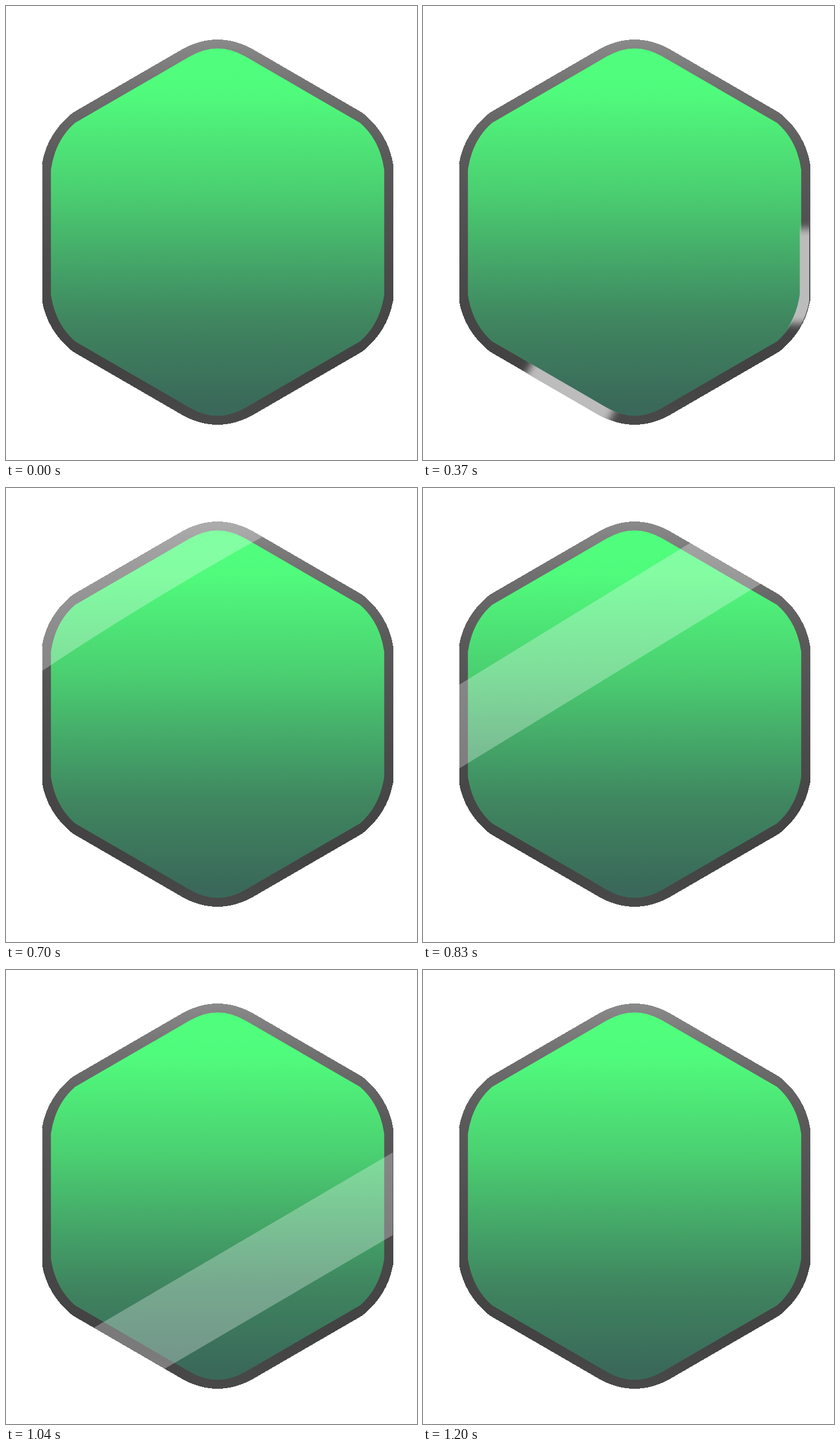
An HTML page for the animation above (1.24 s loop, 712 by 786 pixels).

```html
<!DOCTYPE html>
<html lang="en">
<head>
<meta charset="utf-8">
<title>Glossy hexagon</title>
<style>
  html, body { margin: 0; width: 100%; height: 100%; overflow: hidden; background: #fff; }
  svg { display: block; }
</style>
</head>
<body>
<svg width="712" height="786" viewBox="0 0 712 786">
  <defs>
    <linearGradient id="metal" gradientUnits="userSpaceOnUse" x1="0" y1="-334" x2="0" y2="334">
      <stop offset="0" stop-color="#8a8a8a"/>
      <stop offset=".12" stop-color="#727272"/>
      <stop offset=".3" stop-color="#5a5a5a"/>
      <stop offset=".6" stop-color="#4b4a4a"/>
      <stop offset=".85" stop-color="#424242"/>
      <stop offset="1" stop-color="#494949"/>
    </linearGradient>
    <linearGradient id="glass" gradientUnits="userSpaceOnUse" x1="0" y1="-318" x2="0" y2="318">
      <stop offset="0" stop-color="#50ff7d"/>
      <stop offset=".12" stop-color="#50fb7c"/>
      <stop offset=".39" stop-color="#4bcf71"/>
      <stop offset=".64" stop-color="#429a65"/>
      <stop offset=".75" stop-color="#3f845f"/>
      <stop offset=".97" stop-color="#3a695a"/>
      <stop offset="1" stop-color="#3a685a"/>
    </linearGradient>
    <filter id="soft" filterUnits="userSpaceOnUse" x="-400" y="-420" width="800" height="840"
            color-interpolation-filters="sRGB">
      <feGaussianBlur stdDeviation="7"/>
    </filter>
    <clipPath id="body"><path class="outer"/></clipPath>
    <clipPath id="rim"><path id="ring" clip-rule="evenodd" transform="translate(-1.3 0)"/></clipPath>
  </defs>
  <g transform="translate(366.5 391.5)">
    <path class="outer" fill="url(#metal)" shape-rendering="crispEdges"/>
    <path id="inner" fill="url(#glass)"/>
    <g id="glints" clip-path="url(#rim)" fill="none" stroke-width="70">
      <path class="glint" filter="url(#soft)"/>
      <path class="glint" filter="url(#soft)"/>
    </g>
    <g clip-path="url(#body)">
      <path id="shine" transform="translate(-366.5 -391.5)" fill="#fff" fill-opacity=".29"/>
    </g>
  </g>
</svg>
<script>
const LOOP = 1240, SLOPE = 0.579, SIDE = 342.4, GLINT = 164, FLATTEN = 0.35;

// Hexagon with softened corners: half width, half height, top cut, side cut, half of the upright edge
function hexagon(w, h, top, side, up) {
  const y = x => h - SLOPE * x, s = w - side;
  // side corners bend a little less than a smooth join would
  const pull = (a, b, c) => a + FLATTEN * ((b + c) / 2 - a);
  const cx = pull(w, w, s), cy = pull(y(w), up, y(s));
  return `M${-top},${-y(top)} Q0,${-h} ${top},${-y(top)} L${s},${-y(s)}
    Q${cx},${-cy} ${w},${-up} V${up} Q${cx},${cy} ${s},${y(s)}
    L${top},${y(top)} Q0,${h} ${-top},${y(top)} L${-s},${y(s)}
    Q${-cx},${cy} ${-w},${up} V${-up} Q${-cx},${-cy} ${-s},${-y(s)} Z`;
}

// Sharp hexagon that starts in the middle of the upper left edge and runs clockwise
function track() {
  const w = SIDE * Math.cos(Math.PI / 6), h = SIDE / 2;
  return `M${-w / 2},${-1.5 * h} L0,${-SIDE} L${w},${-h} V${h} L0,${SIDE} L${-w},${h} V${-h} Z`;
}

// Edges are given by their heights at the stage's x = 62 and x = 670
const band = (a, b, c, d) => `M62,${a} L670,${b} V${d} L62,${c} Z`;

// Time, clockwise distance, counter-clockwise distance, grey level
const glintSteps = [
  [80, 152, 207, 210],
  [160, 355, 383, 205],
  [240, 558, 555, 197],
  [370, 761, 727, 188],
  [450, 960, 905, 181],
  [530]
];

const shineSteps = [
  [0, ""],
  [700, "M62,317 Q240,198 445,84 V0 H62 Z"],
  [830, band(341, -32, 486, 114)],
  [910, band(515, 142, 660, 288)],
  [1040, band(672, 316, 815, 459)],
  [1120, band(834, 480, 980, 626)],
  [1200, ""]
];

const all = q => document.querySelectorAll(q);
const byId = id => document.getElementById(id);
const glints = byId("glints"), shine = byId("shine");

const outer = hexagon(304, 352, 64, 53, 119);
all(".outer").forEach(p => p.setAttribute("d", outer));
byId("inner").setAttribute("d", hexagon(288.7, 332, 48, 42, 108));
byId("ring").setAttribute("d", outer + hexagon(287.5, 331, 48, 42, 108));
all(".glint").forEach(p => {
  p.setAttribute("d", track());
  p.setAttribute("stroke-dasharray", `${GLINT} 4000`);
});

const stepAt = (steps, t) => steps.filter(s => s[0] <= t).pop();

function draw(t) {
  const [, right, left, grey] = stepAt(glintSteps, t) || [];
  glints.style.display = right ? "" : "none";
  if (right) {
    glints.setAttribute("stroke", `rgb(${grey},${grey},${grey})`);
    [right, 6 * SIDE - left].forEach((d, i) =>
      all(".glint")[i].setAttribute("stroke-dashoffset", GLINT / 2 - d));
  }
  shine.setAttribute("d", stepAt(shineSteps, t)[1]);
}

const start = performance.now();
function tick() {
  draw((performance.now() - start) % LOOP);
  requestAnimationFrame(tick);
}
tick();
</script>
</body>
</html>
```
